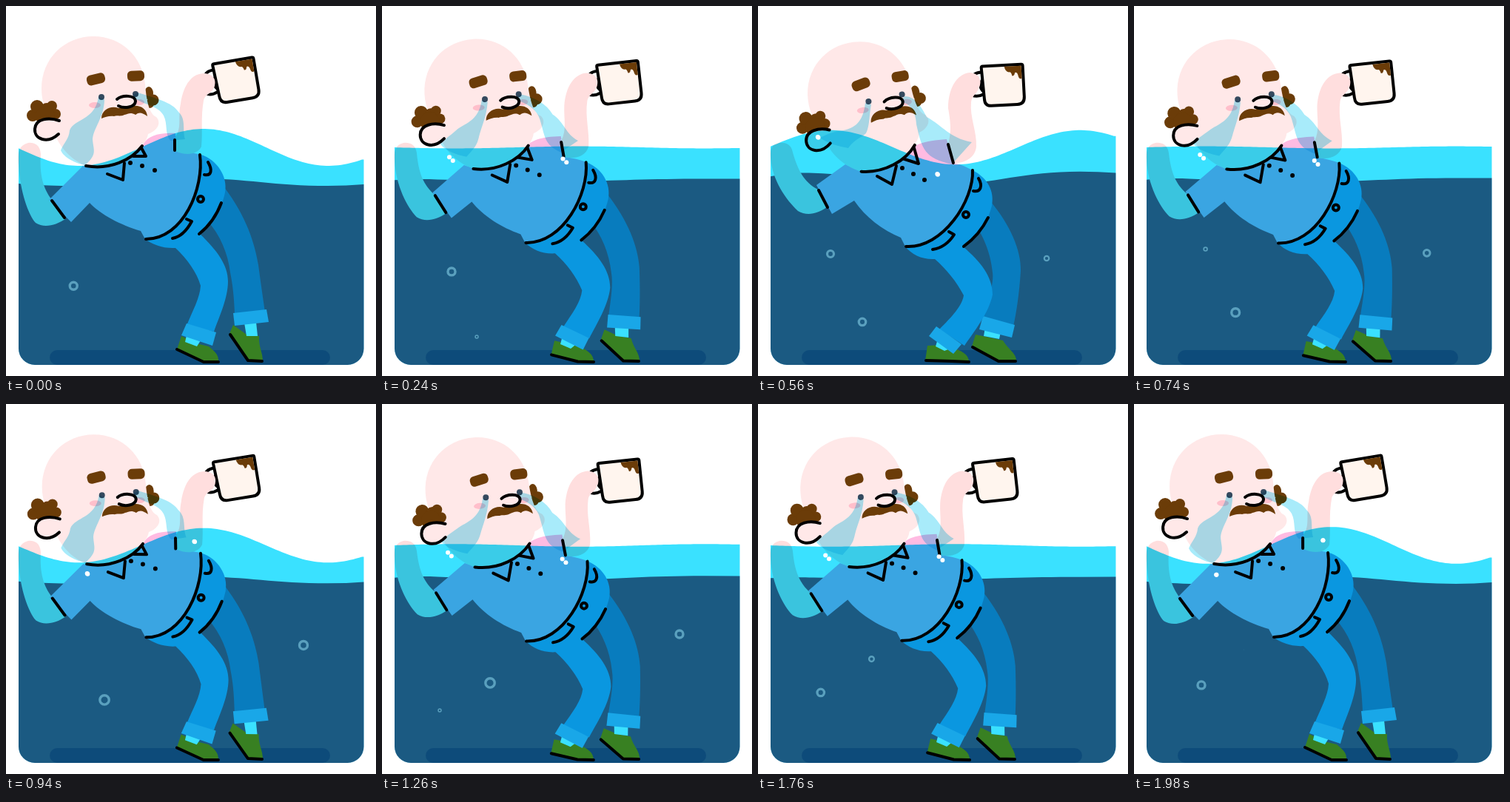
Write an HTML page that moves like this. It is 500 px wide and 500 px high and loops after 2 s.

```html
<!DOCTYPE html>
<html lang="en">
<head>
<meta charset="utf-8">
<title>Afloat</title>
<style>
html, body { margin: 0; width: 100%; height: 100%; overflow: hidden; background: #fff; }
svg { display: block; width: 100%; height: 100%; }
.ink { fill: none; stroke: #000; stroke-width: 4; stroke-linecap: round; stroke-linejoin: round; }
.skin { fill: #ffe8e8; }
.hand { fill: #ffdede; }
.hair { fill: #6b3c08; }
.shirt { fill: #ffbbe2; }
.trousers { fill: #2cabe0; }
.trousersBack { fill: #238dbe; }
.cuff { fill: #6ebee8; }
.sock { fill: #fff; }
.shoe { fill: #f69122; }
.tear { fill: #a8ebfa; mix-blend-mode: multiply; }
.water { fill: #3ae1ff; mix-blend-mode: multiply; }
.bubble { fill: none; stroke: #5aa0be; }
</style>
</head>
<body>
<svg viewBox="0 0 500 500">
  <rect width="500" height="500" fill="#fff"/>
  <path id="deep" fill="#776682"/>
  <rect x="59" y="465" width="379" height="20" rx="10" fill="#39557a"/>
  <g id="body"></g>
  <g id="mug">
    <path class="ink" d="M-28,-19C-36,-19 -41,-16 -42,-9M-43,11Q-36,15 -27,11M-27,-9Q-34,-1 -27,7"/>
    <path class="ink" style="fill:#fff5ee" d="M-26,-27H26Q28,-27 28,-25V17Q28,27 18,27H-17Q-26,27 -26,17L-28,-25Q-28,-27 -26,-27Z"/>
    <path class="hair" d="M3,-25H26V-8Q22,-6 21,-13Q20,-17 17,-16Q16,-11 13,-12Q12,-18 9,-17Q4,-18 3,-25Z"/>
  </g>
  <g id="arm"></g>
  <g id="head">
    <g class="hair">
      <ellipse cx="193" cy="118" rx="6" ry="9"/><circle cx="199" cy="127" r="7.5"/><circle cx="194" cy="132" r="6"/>
    </g>
    <path class="skin" d="M48,112C48,70 80,41 118,41C157,41 185,70 188,106C190,130 194,146 203,150C210,157 206,168 192,173C190,190 155,222 108,216C84,206 68,185 64,165C53,142 48,128 48,112Z"/>
    <g class="hair">
      <circle cx="36" cy="148" r="8"/><circle cx="42" cy="136" r="9"/><circle cx="55" cy="139" r="8"/>
      <circle cx="62" cy="135" r="7"/><circle cx="67" cy="146" r="7"/><circle cx="53" cy="149" r="13"/>
      <rect x="109" y="92" width="25" height="14" rx="5.5" transform="rotate(-14 121 99)"/>
      <rect x="164" y="87.500" width="23" height="14" rx="5.500" transform="rotate(-3 175 95)"/>
    </g>
    <ellipse cx="120" cy="134" rx="8" ry="4" fill="#ffbfcb"/>
    <ellipse cx="180" cy="130" rx="7" ry="4" fill="#ffbfcb"/>
    <circle cx="129" cy="123" r="4" fill="#34495e"/>
    <circle cx="175" cy="119" r="4" fill="#34495e"/>
    <path class="ink skin" style="fill:#ffe8e8" d="M72,155C58,150 40,152 39,166C38,180 56,187 71,173"/>
    <path class="hair" d="M129,152C129,140 142,134 152,138C158,135 168,138 172,135C182,134 190,139 191,149C184,144 180,143 175,147C168,143 165,146 160,147C154,150 150,147 146,149C140,148 134,150 129,152Z"/>
    <path class="ink" style="fill:#ffe8e8" d="M150,126C157,120 175,120 175,129C174,137 160,139 152,135"/>
    <path class="ink" d="M108,216C140,222 170,208 184,189"/>
  </g>
  <g id="tears"></g>
  <path id="sea" class="water"/>
  <g id="bubbles"></g>
  <g id="drops" fill="#fff"></g>
</svg>
<script>
const $ = id => document.getElementById(id);
const add = (parent, tag, attrs) => {
  const el = document.createElementNS('http://www.w3.org/2000/svg', tag);
  for (const k in attrs) el.setAttribute(k, attrs[k]);
  return $(parent).appendChild(el);
};
const numbers = /-?\d+(\.\d+)?/g;
const shapes = [];

// A shape that leans between a left pose and a right pose.
function shape(parent, cls, left, right) {
  const el = add(parent, 'path', { class: cls });
  shapes.push({ el, left, a: left.match(numbers).map(Number), b: right.match(numbers).map(Number) });
}

// Far leg
shape('body', 'trousersBack',
  'M295,245C325,285 336,320 341,350C345,380 348,400 350,414L309,416C308,390 306,375 303,360C300,335 290,310 272,290Z',
  'M315,265C340,295 356,330 355,358C353,390 349,415 345,433L303,423C312,395 319,375 317,360C314,330 303,310 294,295Z');
shape('body', 'shoe',
  'M307,431L302,443L326,478L347,480C347,468 341,460 342,446L325,444Z',
  'M294,444L289,460L325,479L349,480C350,470 338,464 331,452L313,448Z');
shape('body', 'sock', 'M322,428L338,427L340,446L325,446Z', 'M307,434L328,440L326,450L305,446Z');
shape('body', 'cuff', 'M307,415L352,410L355,427L309,432Z', 'M304,419L347,431L343,448L299,437Z');
shape('body', 'ink', 'M303,444L327,479L346,480', 'M290,461L325,480L348,480');

// Near leg and hips
shape('body', 'shoe',
  'M237,446L231,464L267,481L287,481C288,471 281,466 274,460L257,456Z',
  'M229,459L226,479L262,480L285,480C284,470 274,466 266,463L250,458Z');
shape('body', 'sock', 'M244,445L263,452L258,460L242,454Z', 'M243,450L262,462L252,466L240,460Z');
shape('body', 'trousers',
  'M264,201C285,208 300,230 296,252C290,280 275,300 262,308C285,330 300,350 300,372C300,395 288,420 281,440L244,432C252,412 262,395 263,378C258,360 245,342 229,327C212,328 198,322 188,315C238,310 268,250 264,201Z',
  'M290,222C310,232 320,250 316,270C308,300 292,318 278,326C300,345 317,365 317,390C312,415 292,440 279,459L245,437C262,420 276,405 278,391C268,372 255,356 239,342C222,343 208,336 199,325C250,326 294,265 290,222Z');
shape('body', 'cuff', 'M244,429L284,441L279,459L237,445Z', 'M241,433L275,457L264,470L231,446Z');
shape('body', 'ink', 'M231,464L267,481L287,481', 'M227,479L262,480L285,481');
shape('body', 'ink', 'M291,266C285,282 275,297 261,308', 'M311,286C303,302 292,315 278,325');
shape('body', 'ink', 'M244,288L251,291C244,304 236,312 225,314', 'M258,305L265,309C258,320 249,327 236,329');
shape('body', 'ink', 'M273,211C279,221 278,230 268,228', 'M298,233C304,243 301,252 291,250');
shape('body', 'ink', 'M259,261A4,4 0 1,1 267,261A4,4 0 1,1 259,261', 'M277,282A4,4 0 1,1 285,282A4,4 0 1,1 277,282');

// Torso
shape('body', 'hand',
  'M62,262C50,246 45,228 47,200C46,186 36,184 30,185C18,188 15,198 17,215C19,250 30,282 40,293C52,301 68,296 80,288Z',
  'M81,248C62,238 54,222 47,198C45,186 36,184 28,185C18,187 16,195 17,205C19,235 38,262 54,277C66,284 80,281 93,272Z');
shape('body', 'shirt',
  'M58,262L104,216C130,222 165,208 186,186C192,176 205,171 229,172L229,196C245,198 258,199 264,201C268,250 238,310 188,315L182,304C155,296 128,282 113,266L88,292Z',
  'M79,242L118,214C145,228 185,222 200,200C206,188 225,182 255,180L264,212C275,214 284,219 290,222C294,265 250,326 199,325L193,313C168,303 145,285 130,263L100,281Z');
shape('body', 'ink', 'M262,201C268,245 240,315 189,315', 'M290,222C292,262 250,328 200,325');
shape('body', 'ink', 'M62,263L79,286', 'M82,249L94,272');
shape('body', 'ink', 'M137,227L158,235L160,212', 'M161,230L181,241L187,216');
shape('body', 'ink', 'M172,203L189,203L182,190', 'M195,206L217,213L211,192');
const button = (x, y) => `M${x - 1},${y}A1,1 0 1,1 ${x + 1},${y}A1,1 0 1,1 ${x - 1},${y}`;
shape('body', 'ink', button(168, 212), button(195, 219));
shape('body', 'ink', button(184, 216), button(210, 227));
shape('body', 'ink', button(201, 222), button(225, 235));

// Raised arm
shape('arm', 'hand',
  'M229,196L229,176C238,165 232,150 236,132C240,105 252,91 268,91C281,92 284,100 282,108C279,119 269,118 267,128C263,150 266,170 264,190C258,202 242,202 229,196Z',
  'M262,212L257,186C262,170 260,155 257,138C257,112 268,92 286,90C299,91 302,99 300,107C297,119 289,120 288,130C286,150 296,170 295,190C294,205 278,214 262,212Z');
shape('arm', 'ink', 'M228,181L228,195', 'M257,187L264,212');

shape('tears', 'tear',
  'M125,123L133,126C133,150 118,165 117,180C118,195 124,200 107,215C95,213 78,205 74,195C78,185 85,180 86,168C92,152 120,155 125,123Z',
  'M145,131L153,133C150,150 151,162 146,172C140,178 130,180 122,192C110,190 92,185 84,178C92,174 100,170 115,168C130,165 142,158 145,131Z');
shape('tears', 'tear',
  'M172,120L178,117C200,124 225,130 233,143C244,153 238,168 242,180L222,182C214,172 219,160 213,148C206,135 188,134 172,124Z',
  'M193,128L198,122C212,122 220,135 228,150C250,162 258,178 289,184L262,214C225,205 222,195 214,160C214,145 205,130 193,130Z');

// Each key: time in seconds, x, y, radius
const bubbles = [
  [[1.18, 77, 418, 0], [1.26, 78, 414, 2], [1.56, 79, 399, 4.5], [1.98, 91, 380, 5], [2.24, 94, 359, 5], [2.56, 98, 335, 4.5], [2.95, 95, 321, 0]],
  [[0.15, 126, 453, 0], [0.24, 128, 447, 2], [0.56, 141, 427, 4.7], [0.94, 133, 400, 6.2], [1.26, 146, 377, 6.2], [1.56, 158, 356, 6.2], [2, 148, 331, 0]],
  [[0.4, 385, 348, 0], [0.56, 390, 341, 3.2], [0.94, 402, 326, 5.5], [1.26, 402, 311, 5], [1.5, 401, 300, 0]]
].map(keys => ({ keys, el: add('bubbles', 'circle', { class: 'bubble' }) }));
const drops = [0, 1, 2, 3].map(() => add('drops', 'circle', { r: 3 }));

const mix = (a, b, k) => a + (b - a) * k;
const place = (el, x, y) => { el.setAttribute('cx', x); el.setAttribute('cy', y); };

const basin = 'V463A22,22 0 0 1 461.500,485H39A22,22 0 0 1 17,463Z';

function seaPath(swing) {
  let d = '';
  for (let x = 17; x <= 483; x += 4) {
    const y = 191 - 25 * swing * Math.cos(2 * Math.PI * (x - 267) / 337);
    d += `${d ? 'L' : 'M'}${x},${y.toFixed(2)}`;
  }
  return d + `H483.5` + basin;
}

function deepPath(swing) {
  const y = (base, gain) => base + gain * swing;
  return `M17,${y(235, 5)}C35,${y(234, 8)} 50,${y(233, 9)} 75,${y(234, 9)}` +
    `C140,${y(236, 9)} 180,${y(238, -5)} 250,${y(238, -5)}` +
    `C320,${y(236, -4)} 360,${y(233, 10)} 435,${y(233, 10)}` +
    `Q460,${y(233, 10)} 483.5,${y(233, 8)}` + basin;
}

function drawBubble({ keys, el }, time) {
  const t = time < keys[0][0] ? time + 2 : time;
  const i = keys.findIndex(k => k[0] > t);
  el.style.display = i < 1 ? 'none' : '';
  if (i < 1) return;
  const a = keys[i - 1], b = keys[i], k = (t - a[0]) / (b[0] - a[0]);
  const r = mix(a[3], b[3], k);
  place(el, mix(a[1], b[1], k), mix(a[2], b[2], k));
  el.setAttribute('r', r);
  el.setAttribute('stroke-width', Math.min(3.4, r * 0.7));
}

function draw(time) {
  const swing = Math.cos(2 * Math.PI * time);
  const p = (1 - swing) / 2, lean = p / 0.965;

  for (const s of shapes) {
    let i = 0;
    s.el.setAttribute('d', s.left.replace(numbers, () => {
      const v = mix(s.a[i], s.b[i], lean);
      i++;
      return +v.toFixed(2);
    }));
  }
  $('head').setAttribute('transform', `translate(${19.2 * lean} ${7.3 * lean}) rotate(${-6.8 * lean} 118 112)`);
  $('mug').setAttribute('transform', `translate(${311 + 20 * lean} ${100.5 + 6.5 * lean}) rotate(${-9.5 + 6.5 * lean})`);
  $('sea').setAttribute('d', seaPath(swing));
  $('deep').setAttribute('d', deepPath(swing));
  bubbles.forEach(b => drawBubble(b, time));

  const arc = p * (1 - p), gap = 2.4 * (1 - swing * swing);
  $('drops').style.display = time < 0.08 ? 'none' : '';
  drops.forEach((el, i) => {
    const side = i % 2 ? gap : -gap;
    if (i < 2) place(el, 111.5 - 31 * p - 14 * arc + side, 231 - 56 * p + 8 * arc + side);
    else place(el, 255.5 - 13 * p - 10 * arc + side, 184 + 44.5 * p + 16 * arc + side);
  });
}

function frame(now) {
  draw(now % 2000 / 1000);
  requestAnimationFrame(frame);
}
draw(0);
requestAnimationFrame(frame);
</script>
</body>
</html>
```
